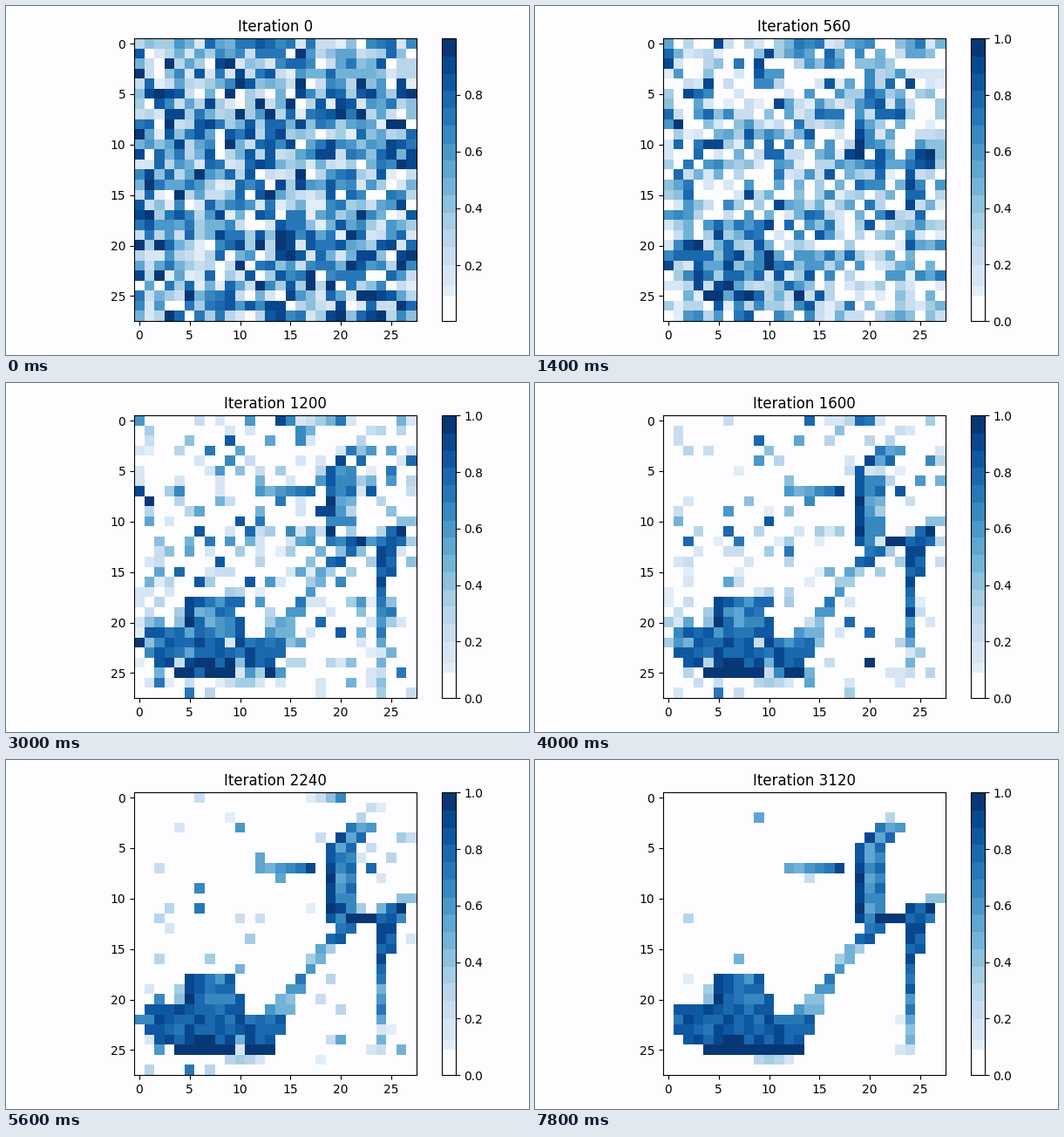
A matplotlib script for the animation above (8 s loop, 600 by 400 pixels).

```python
import numpy as np
import matplotlib.pyplot as plt
from matplotlib.animation import FuncAnimation
from matplotlib.colors import ListedColormap

N, FRAMES, STEP, DELAY = 28, 40, 80, 200
PAPER = "#fdfdff"
rng = np.random.default_rng(7)


def banded_blues(steps=16):
    """Blues in flat steps, with the lightest step as plain paper."""
    edges = np.r_[0, .09, .125, np.linspace(.2, 1, steps - 2)]
    shades = [PAPER] + [plt.cm.Blues(m) for m in (edges[1:-1] + edges[2:]) / 2]
    pos = (np.arange(256) + .5) / 256
    return ListedColormap([shades[i - 1] for i in np.searchsorted(edges, pos)])


def fill(img, top, bottom, left, right, shade):
    """Fill rows between two edges, each a column or (rows, columns) bends.

    shade takes the relative height s and the relative place t in the row.
    """
    def column(edge, row):
        return round(np.interp(row, *edge)) if isinstance(edge, tuple) else edge

    for row in range(top, bottom + 1):
        a, b = column(left, row), column(right, row)
        cols = np.arange(a, b + 1)
        s = (row - top) / max(bottom - top, 1)
        img[row, cols] = shade(s, (cols - a) / max(b - a, 1))


def draw_sandal():
    img = np.zeros((N, N))
    # ankle cuff, instep strap and buckle
    fill(img, 2, 12, ([2, 5], [22, 19]), ([2, 3, 5], [22, 23, 21]),
         lambda s, t: min(1, .3 + 5 * s) * (.95 - 1.1 * t + .85 * t * t))
    fill(img, 7, 7, 12, 17, lambda s, t: .45 + .45 * t)
    fill(img, 12, 12, 21, 25, lambda s, t: 1.1)
    # heel
    fill(img, 10, 25, ([10, 11, 24, 25], [26, 24, 24, 23]),
         ([10, 12, 13, 15, 16], [27, 26, 25, 25, 24]),
         lambda s, t: min(1, .5 + 8 * s) * (.86 - .6 * s ** 3))
    # arch
    fill(img, 13, 21, ([13, 16, 17, 21], [20, 17, 17, 13]),
         ([13, 18, 21], [21, 16, 15]),
         lambda s, t: .58 + .28 * (1 - .7 * s) * np.cos(11.2 * s - .7))
    # toe band and sole
    fill(img, 19, 20, 4, 4, lambda s, t: .45)
    fill(img, 18, 20, 5, ([19, 20], [9, 10]),
         lambda s, t: .97 - .9 * t + .7 * t * t)
    fill(img, 21, 25, ([23, 24, 25], [1, 2, 4]),
         ([21, 22, 23, 24], [10, 14, 14, 13]),
         lambda s, t: .82 + .3 * s ** 6)
    fill(img, 26, 26, 9, 12, lambda s, t: .22 + .2 * np.sin(np.pi * t))

    grain = rng.uniform(-.1, .1, (N, N))
    return np.where(img > 0, np.clip(img + grain, 0, 1), 0)


def evolve(goal):
    """Each cell stays noisy for its own lifetime, then settles on the goal."""
    life = 16 * rng.weibull(1.5, (N, N))
    noise, pull = rng.random((2, N, N))
    shots = []
    for k in range(FRAMES):
        fresh = (rng.random((N, N)) < .15) & (k > 0)
        noise = np.where(fresh, rng.random((N, N)), noise)
        rough = goal + (noise - goal) * pull ** (k / 25)
        stray = (rng.random((N, N)) < .005) & (goal == 0)
        settled = np.where(stray, .3 * noise, goal)
        shots.append(np.where((k < life) | (k == 0), rough, settled))
    return shots


shots = evolve(draw_sandal())

fig, ax = plt.subplots(figsize=(6, 4), dpi=100, facecolor=PAPER)
image = ax.imshow(shots[0], cmap=banded_blues(), vmin=0, vmax=1,
                  interpolation="nearest")
fig.colorbar(image)
title = ax.set_title("Iteration 0")
fig.tight_layout()


def update(k):
    # the scale follows the data while it is pure noise
    low, high = (shots[0].min(), shots[0].max()) if k == 0 else (0, 1)
    image.set_data(shots[k])
    image.set_clim(low, high)
    title.set_text(f"Iteration {k * STEP}")
    return image, title


anim = FuncAnimation(fig, update, frames=FRAMES, interval=DELAY,
                     init_func=lambda: update(0), repeat=True,
                     repeat_delay=0, blit=False)
plt.show()
```
